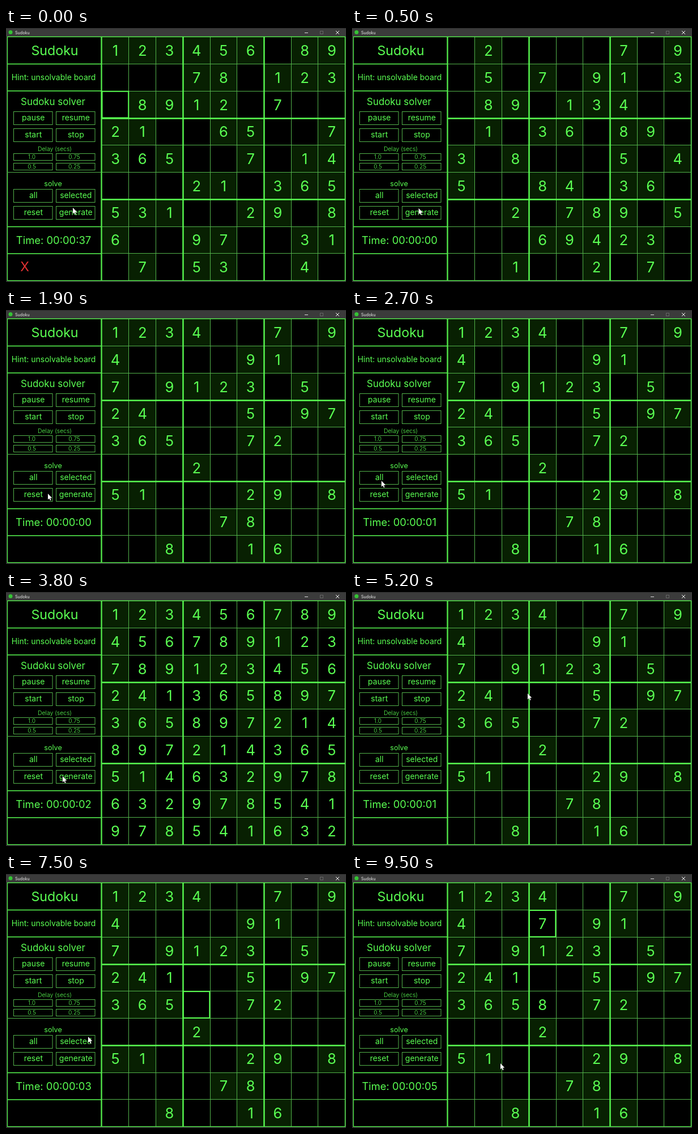
An HTML page with a canvas that plays this animation: 600 px wide and 448 px high, repeating every 9.6 s.

```html
<!DOCTYPE html>
<html lang="en">
<head>
<meta charset="utf-8">
<title>Sudoku</title>
<style>
  html, body { margin: 0; height: 100%; overflow: hidden; background: #000; }
  canvas { display: block; }
</style>
</head>
<body>
<canvas id="stage" width="600" height="448"></canvas>
<script>
const ctx = document.getElementById('stage').getContext('2d');
const LOOP = 9600;
const GREEN = '#5aff52', DIM = '#52b24a', GIVEN = '#082002';
const LEFT = 169.2, TOP = 16, CELL = 47.72;

// Givens row by row; a dot is an empty cell.
const parse = rows => [...rows.replace(/\s/g, '')].map(ch => ch === '.' ? 0 : +ch);
const UNSOLVABLE = parse(`123456.89 ...78.123 .8912.... 21..65..7 3.5..7.14
                          ...21.365 531..29.8 6..97..31 .7.53..4.`);
const SECOND = parse(`.2....7.9 .5.7.91.3 .89.134.. .1.36.89. 3.8...5.4
                      5..84.36. ..2.789.5 ...69423. ..1..2.7.`);
const THIRD = parse(`1234..7.9 4....91.. 7.9123.5. 24...5.97 365..72..
                     ...2..... 51...29.8 ....78... ..8..16..`);
const SOLUTION = solve([...THIRD]);

const FIRST_CLICK = 500, SECOND_CLICK = 1300, SOLVE_ALL = 3100, RESET = 4100;
const PICKS = [
  { cell: 29, picked: 5400, solved: 6400 },
  { cell: 39, picked: 7000, solved: 7700 },
  { cell: 12, picked: 8500, solved: 9200 }
];

// Pointer stops: time, x, y. It rests a little at each before moving on.
const STOPS = [
  [0, 118, 317], [1200, 116, 323], [1900, 74, 324], [2900, 48, 297], [3800, 100, 325],
  [4100, 66, 326], [5200, 310, 179], [6300, 128, 297], [7000, 335, 232],
  [7500, 145, 287], [8500, 336, 92], [9200, 130, 297], [9500, 262, 334]
];
const REST = 0.2;

const BUTTON_ROWS = [
  [147, 'pause', 'resume'], [177, 'start', 'stop'], [221, '1.0', '0.75'],
  [238, '0.5', '0.25'], [284, 'all', 'selected'], [314, 'reset', 'generate']
];

function fits(board, cell, digit) {
  const row = Math.floor(cell / 9), col = cell % 9;
  return board.every((value, i) => {
    const r = Math.floor(i / 9), c = i % 9;
    const sameBox = Math.floor(r / 3) === Math.floor(row / 3) && Math.floor(c / 3) === Math.floor(col / 3);
    return value !== digit || (r !== row && c !== col && !sameBox);
  });
}

// Backtracking, smallest digit first.
function solve(board) {
  const cell = board.indexOf(0);
  if (cell < 0) return board;
  for (let digit = 1; digit <= 9; digit++) {
    if (!fits(board, cell, digit)) continue;
    board[cell] = digit;
    if (solve(board)) return board;
  }
  board[cell] = 0;
  return null;
}

function box(x, y, w, h, color = DIM, width = 1) {
  ctx.strokeStyle = color;
  ctx.lineWidth = width;
  ctx.strokeRect(x, y, w, h);
}

function line(x1, y1, x2, y2, color = DIM, width = 1) {
  ctx.strokeStyle = color;
  ctx.lineWidth = width;
  ctx.beginPath();
  ctx.moveTo(x1, y1);
  ctx.lineTo(x2, y2);
  ctx.stroke();
}

function fill(color, x, y, w, h) {
  ctx.fillStyle = color;
  ctx.fillRect(x, y, w, h);
}

function text(str, x, y, size, color = GREEN, weight = 400) {
  ctx.font = `${weight} ${size}px Inter, sans-serif`;
  ctx.fillStyle = color;
  ctx.fillText(str, x, y);
}

function drawWindow() {
  fill('#2b2b2b', 0, 0, 600, 448);
  fill('#3b3b3b', 0, 1, 600, 14);
  fill('#000', 1.5, 15, 597.5, 431);
  ctx.fillStyle = '#35c435';
  ctx.beginPath();
  ctx.arc(8, 7.5, 3.5, 0, 7);
  ctx.fill();
  ctx.textAlign = 'left';
  text('Sudoku', 16, 10.5, 7.2, '#eee');
  ctx.textAlign = 'center';
  line(527, 8.5, 533, 8.5, '#ddd');
  box(554.5, 5.5, 5, 5, '#666');
  line(582, 5, 588, 11, '#eee');
  line(588, 5, 582, 11, '#eee');
}

function drawSidebar(clock, failed) {
  box(2.5, 15.5, 165.5, 430, GREEN, 1.3);
  for (const y of [63.5, 111, 350.5, 398]) line(2, y, 168, y, GREEN, 1.3);
  line(2, 254.5, 168, 254.5);
  text('Sudoku', 86, 48, 23.2);
  text('Hint: unsolvable board', 84, 92, 14);
  text('Sudoku solver', 83, 136, 16.9);
  text('Delay (secs)', 86, 217, 10.4, GREEN, 300);
  text('solve', 83, 279, 12.6);
  for (const [y, ...labels] of BUTTON_ROWS) labels.forEach((label, col) => {
    const small = label.includes('.'), x = 13.5 + col * 75;
    box(x, y + .5, 68.5, small ? 12 : 23);
    if (small) text(label, x + 32, y + 10.3, 10.2, GREEN, 300);
    else text(label, x + 34.8, y + 16.3, 14);
  });
  text('Time: 00:00:' + String(clock).padStart(2, '0'), 84, 381, 18.4);
  if (failed) text('X', 33, 429, 23, '#e23232');
}

function drawBoard(givens, entered, picked) {
  const place = cell => [LEFT + cell % 9 * CELL, TOP + Math.floor(cell / 9) * CELL];
  givens.forEach((given, cell) => {
    const [x, y] = place(cell), digit = given || entered(cell);
    if (given) fill(GIVEN, x, y, CELL, CELL);
    if (digit) text(digit, x + CELL / 2, y + CELL / 2 + 9.2, 25.6);
  });
  const size = 9 * CELL, snap = v => Math.floor(v) + .5;
  for (const bold of [false, true]) for (let i = 1; i < 9; i++) {
    if ((i % 3 === 0) !== bold) continue;
    const x = snap(LEFT + i * CELL), y = snap(TOP + i * CELL);
    const style = bold ? [GREEN, 2.4] : [DIM, 1];
    line(x, TOP, x, TOP + size, ...style);
    line(LEFT, y, LEFT + size, y, ...style);
  }
  box(169, 15.5, 429.5, 430, GREEN, 1.3);
  if (picked >= 0) {
    const [x, y] = place(picked);
    box(x + .3, y + .3, CELL - 1, CELL - 1, GREEN, 2);
  }
}

function drawPointer(t) {
  const next = Math.max(1, STOPS.findIndex(stop => stop[0] > t));
  const last = STOPS.length - 1, i = t >= STOPS[last][0] ? last : next;
  const [t0, x0, y0] = STOPS[i - 1], [t1, x1, y1] = STOPS[i];
  const k = Math.min(1, Math.max(0, ((t - t0) / (t1 - t0) - REST) / (1 - REST)));
  const ease = k * k * (3 - 2 * k);
  ctx.save();
  ctx.translate(x0 + (x1 - x0) * ease, y0 + (y1 - y0) * ease);
  const arrow = new Path2D('M0 0V10.5L2.4 8.3 4 12 5.6 11.3 4 7.7 7.2 7.5Z');
  ctx.lineWidth = 1;
  ctx.strokeStyle = '#111';
  ctx.stroke(arrow);
  ctx.fillStyle = '#fff';
  ctx.fill(arrow);
  ctx.restore();
}

function draw(t) {
  const failed = t < FIRST_CLICK;
  const givens = failed ? UNSOLVABLE : t < SECOND_CLICK ? SECOND : THIRD;
  const start = [RESET, SECOND_CLICK, FIRST_CLICK].find(click => t >= click);
  const clock = failed ? 37 : Math.floor((t - start) / 1000);
  const allSolved = t >= SOLVE_ALL && t < RESET;
  const latest = PICKS.filter(p => t >= p.picked).pop();
  const picked = failed ? 18 : latest ? latest.cell : -1;
  const entered = cell => {
    if (failed) return { 24: 7, 37: 6 }[cell];
    const solved = allSolved || PICKS.some(p => p.cell === cell && t >= p.solved);
    return solved && SOLUTION[cell];
  };

  drawWindow();
  drawSidebar(clock, failed);
  drawBoard(givens, entered, picked);
  drawPointer(t);
}

function tick() {
  draw(performance.now() % LOOP);
  requestAnimationFrame(tick);
}
tick();
</script>
</body>
</html>
```
